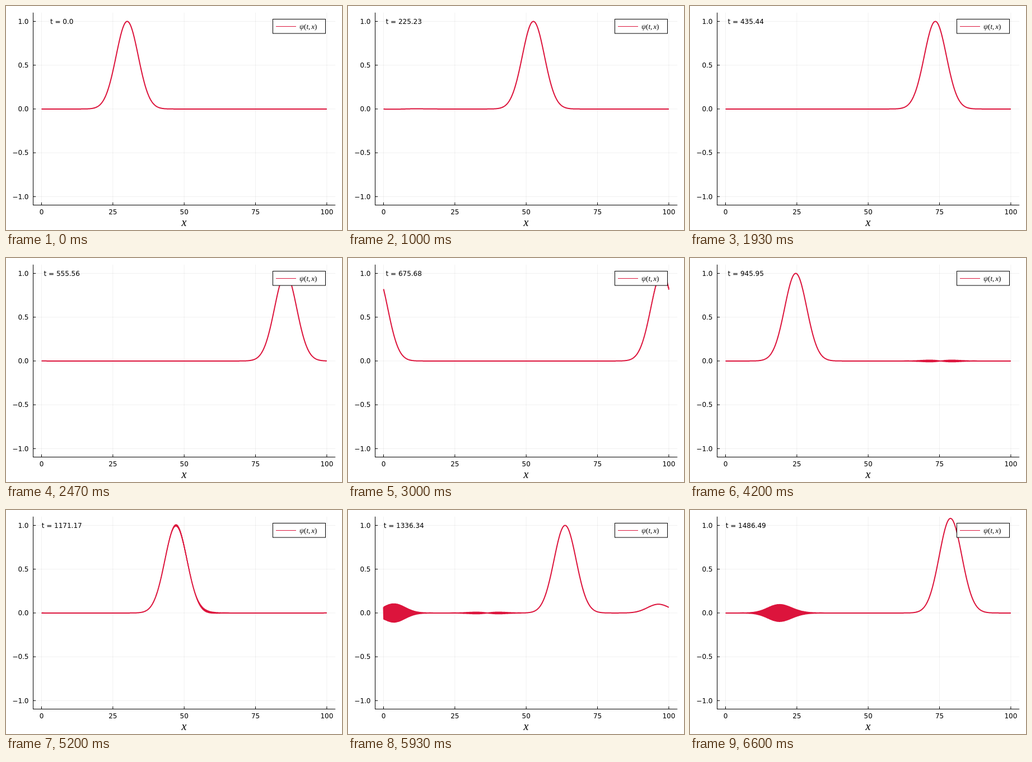
An HTML page that plays this animation: 600x400 px, repeating every 6.67 s.

```html
<!DOCTYPE html>
<html lang="en">
<head>
<meta charset="utf-8">
<title>Travelling pulse</title>
<style>
  html, body { margin: 0; width: 100%; height: 100%; overflow: hidden; background: #fff; }
  svg { display: block; width: 600px; height: 400px; }
  text { font: 12px "DejaVu Sans", sans-serif; fill: #000; }
  .math { font-family: "Liberation Serif", serif; font-style: italic; }
  .up { font-style: normal; }
</style>
</head>
<body>
<svg viewBox="0 0 600 400">
  <clipPath id="area"><rect x="48.2" y="11.8" width="540" height="344"/></clipPath>
  <g id="grid" stroke="#000" stroke-opacity=".1" stroke-width=".6"></g>
  <g id="axes" stroke="#000" fill="none"><path d="M48.5 11.8V355.7M48 355.5H588.2"/></g>
  <g id="labels"></g>
  <text class="math" x="318" y="393" text-anchor="middle" style="font-size:20px">x</text>
  <path id="curve" clip-path="url(#area)" fill="none" stroke="#dc143c" stroke-width="2" stroke-linejoin="round"/>
  <text id="clock" x="99.7" y="32" text-anchor="middle"></text>
  <rect x="476.5" y="23.5" width="94" height="25.5" fill="#fff" stroke="#000"/>
  <path d="M482 36.5H518" stroke="#dc143c" stroke-width="1.1"/>
  <text class="math" x="524" y="41" style="font-size:13px">ψ<tspan class="up">(</tspan>t,<tspan dx="2">x</tspan><tspan class="up">)</tspan></text>
</svg>
<script>
const LOOP = 6670, FPS = 15, POINTS = 1000;
const T_STEP = 15000 / 999, SPEED = 0.1;
const $ = id => document.getElementById(id);
const px = x => 63.5 + x * 5.094;
const py = y => 183.9 - y * 156.4;

function add(parent, tag, attrs, text = "") {
  const el = document.createElementNS("http://www.w3.org/2000/svg", tag);
  for (const name in attrs) el.setAttribute(name, attrs[name]);
  el.textContent = text;
  $(parent).append(el);
}

for (const v of [0, 25, 50, 75, 100]) {
  const x = px(v);
  add("grid", "path", { d: `M${x} 11.8V355.7` });
  add("axes", "path", { d: `M${x} 355.7v-5` });
  add("labels", "text", { x, y: 371.5, "text-anchor": "middle" }, v);
}
for (const v of [-1, -0.5, 0, 0.5, 1]) {
  const y = py(v);
  add("grid", "path", { d: `M48.2 ${y}H588.2` });
  add("axes", "path", { d: `M48.2 ${y}h5` });
  add("labels", "text", { x: 40.5, y: y + 4.3, "text-anchor": "end" }, v.toFixed(1).replace("-", "−"));
}

const bell = u => Math.exp(-u * u / 30);
const dipole = u => u / Math.sqrt(15) * Math.exp(0.5 - u * u / 30);
const wrap = u => u - 100 * Math.round(u / 100);

// Main pulse, its weak counter-moving echoes, and the sawtooth grid modes.
function psi(j, shift) {
  const x = j * 100 / POINTS;
  const smooth = bell(wrap(x - 30 - shift))
    + 0.0025 * dipole(x - 30 + shift)
    + 0.1 * bell(x - 230 + shift);
  const saw = 0.009 * dipole(x - 170 + shift) + 0.104 * bell(x + 130 - shift);
  return smooth + (j % 2 ? -saw : saw);
}

function draw(ms) {
  const step = Math.floor((Math.floor(ms / 10) * 10 + 5) * FPS / 1000);
  const t = step * T_STEP;
  let d = "";
  for (let j = 0; j <= POINTS; j++) {
    d += (j ? "L" : "M") + px(j * 100 / POINTS).toFixed(2) + " " + py(psi(j, t * SPEED)).toFixed(2);
  }
  $("curve").setAttribute("d", d);
  const value = String(+t.toFixed(2));
  $("clock").textContent = "t = " + (value.includes(".") ? value : value + ".0");
}

function tick() {
  draw(performance.now() % LOOP);
  requestAnimationFrame(tick);
}
tick();
</script>
</body>
</html>
```
